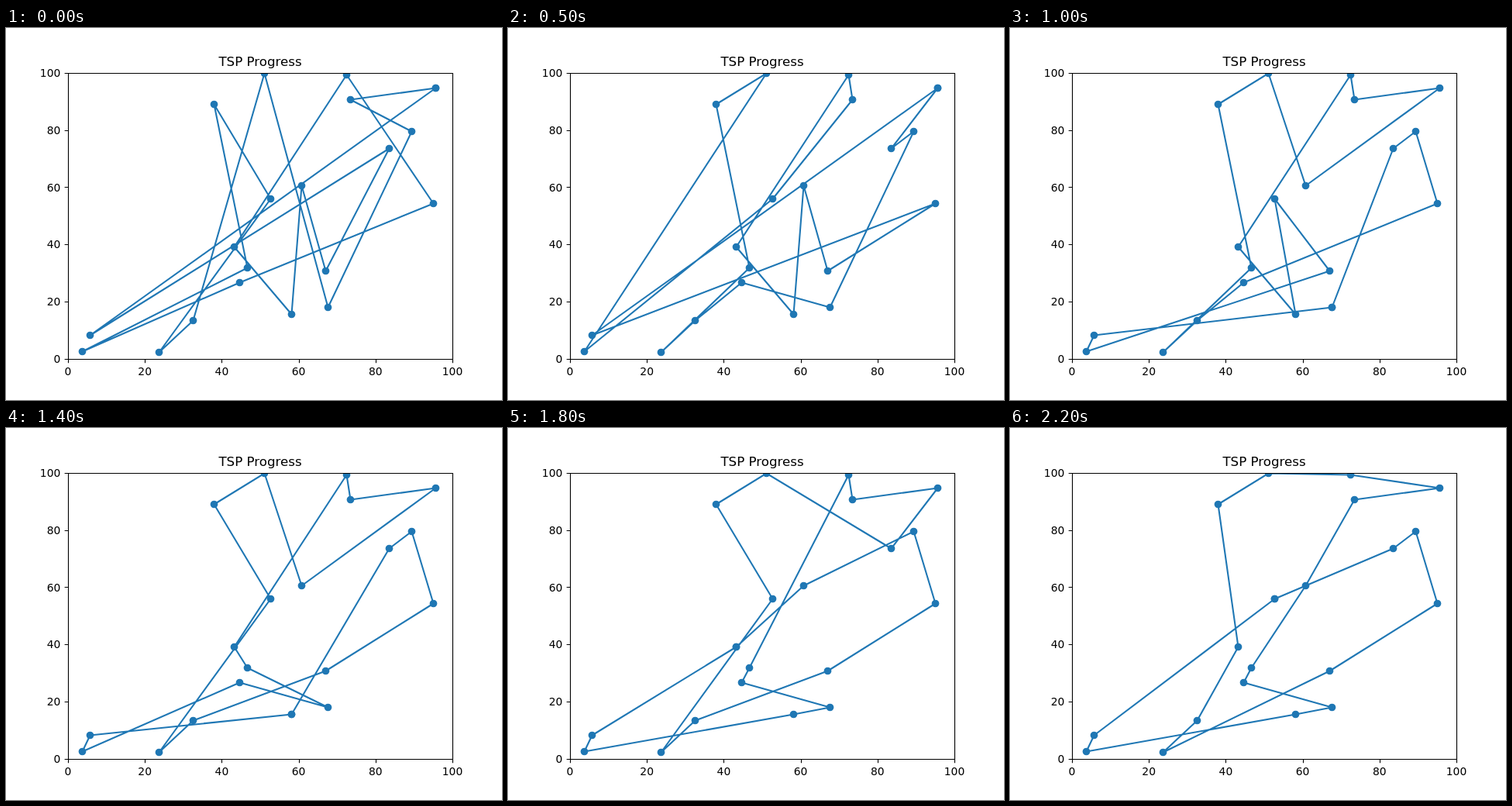
Recreate the animation shown at these times as an HTML page. Size 640 by 480 pixels, loop 2.3 s.

```html
<!DOCTYPE html>
<html lang="en">
<head>
<meta charset="utf-8">
<title>TSP Progress</title>
<style>
  html, body { margin: 0; width: 100%; height: 100%; overflow: hidden; background: #fff; }
  svg { display: block; width: 640px; height: 480px; }
  text { font: 13.89px "DejaVu Sans", Verdana, sans-serif; }
  .title { font-size: 16.67px; }
  .axis { stroke: #000; stroke-width: 1.11; fill: none; }
  .route { stroke: #1f77b4; stroke-width: 2.083; stroke-linejoin: round; fill: none; }
  .city { fill: #1f77b4; }
</style>
</head>
<body>
<svg viewBox="0 0 640 480">
  <clipPath id="plot"><rect x="80" y="58" width="496" height="369"/></clipPath>
  <g clip-path="url(#plot)">
    <g id="chart" transform="translate(.5 .5)"><path id="route" class="route"/></g>
  </g>
  <g id="axes"><path class="axis" d="M80.5 58.5H576.5V427.5H80.5Z"/></g>
  <text class="title" x="328" y="49" text-anchor="middle">TSP Progress</text>
</svg>
<script>
const cities = {
  A: [98, 417], B: [108, 396], C: [197, 418], D: [241, 377], E: [301, 328],
  F: [311, 309], G: [294, 282], H: [341, 220], I: [268, 98], J: [333, 58],
  K: [439, 60], L: [444, 92], M: [554, 77], N: [523, 133], O: [494, 155],
  P: [551, 226], Q: [381, 203], R: [412, 313], S: [368, 369], T: [415, 360]
};
const firstTour = 'MBORQSGKPEAFIHCDJTNL';
// Each step of the search exchanges two cities in the tour.
const swaps = 'JE JF LP OP HF MA AP HM QH PT FH FS ST ER QO SF ES FG GH KO QO CD'.split(' ');
const STEP = 100;

const swap = (tour, [a, b]) =>
  [...tour].map(c => c === a ? b : c === b ? a : c).join('');
const tours = [firstTour];
for (const pair of swaps) tours.push(swap(tours[tours.length - 1], pair));

function add(parent, tag, attrs, text) {
  const el = document.createElementNS('http://www.w3.org/2000/svg', tag);
  for (const key in attrs) el.setAttribute(key, attrs[key]);
  if (text !== undefined) el.textContent = text;
  parent.appendChild(el);
  return el;
}

const chart = document.getElementById('chart');
const route = document.getElementById('route');
const axes = document.getElementById('axes');
const snap = v => Math.floor(v + 0.5) + 0.5;

for (let v = 0; v <= 100; v += 20) {
  const x = 80 + v * 4.96, y = 427.2 - v * 3.696;
  add(axes, 'path', { class: 'axis', d: `M${snap(x)} 427.5v4.86M80.5 ${snap(y)}h-4.86` });
  add(axes, 'text', { x, y: 448, 'text-anchor': 'middle' }, v);
  add(axes, 'text', { x: 70.3, y: Math.round(y + 5.1), 'text-anchor': 'end' }, v);
}

const addCity = ([cx, cy]) => add(chart, 'circle', { class: 'city', cx, cy, r: 4.86 });
Object.values(cities).forEach(addCity);
// The closed route marks its first city twice.
const start = addCity(cities[firstTour[0]]);

let shown = -1;
function draw(now) {
  const step = Math.floor(now / STEP) % tours.length;
  if (step !== shown) {
    shown = step;
    const points = [...tours[step]].map(c => cities[c]);
    route.setAttribute('d', 'M' + points.join('L') + 'Z');
    start.setAttribute('cx', points[0][0]);
    start.setAttribute('cy', points[0][1]);
  }
}

const begin = performance.now();
function tick() {
  draw(performance.now() - begin);
  requestAnimationFrame(tick);
}
tick();
</script>
</body>
</html>
```
